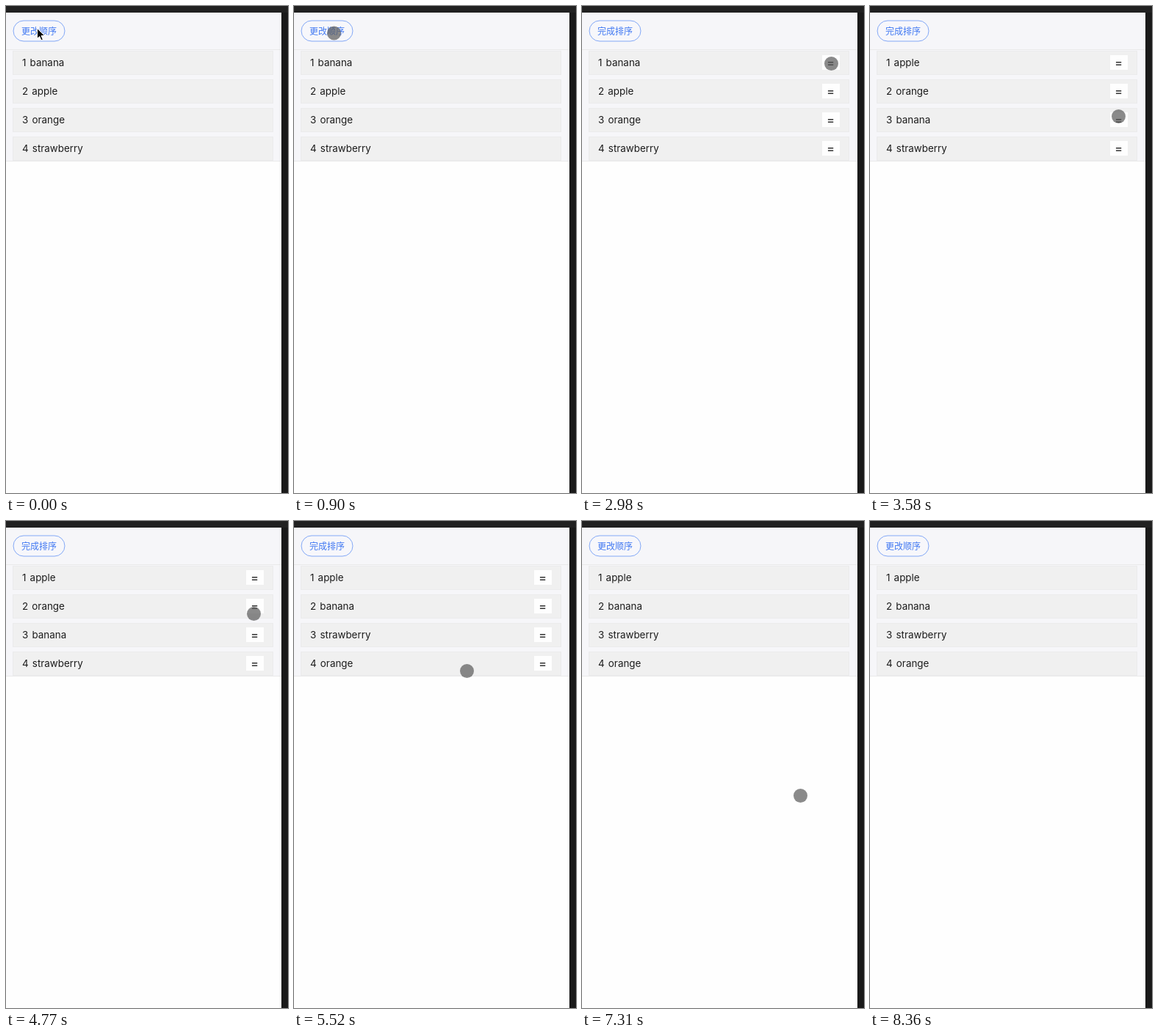
Recreate the animation shown at these times as an HTML page. Size 384 px wide and 664 px high, loop 9.41 s.

```html
<!DOCTYPE html>
<html lang="zh">
<head>
<meta charset="utf-8">
<style>
  html, body { margin: 0; width: 100%; height: 100%; overflow: hidden; background: #212121; }
  svg { display: block; width: 384px; height: 664px; }
  text { font: 13.4px Inter, sans-serif; word-spacing: 1.4px; fill: #1c1c1c; }
  .label { font: 12px "Noto Sans CJK SC", "Noto Sans CJK", sans-serif; fill: #4078f2; }
  .equals { font-size: 16px; font-weight: 500; fill: #333; text-anchor: middle; }
</style>
</head>
<body>
<svg viewBox="0 0 384 664">
  <rect width="384" height="664" fill="#212121"/>
  <rect x="375" y="9" width="9" height="655" fill="#1a1a1a"/>
  <rect y="9" width="375" height="655" fill="#fefefe"/>
  <rect y="9" width="375" height="203" fill="#f6f6f9"/>
  <path d="M0 59.5H375M0 211.5H375" stroke="#e9e9ea"/>
  <rect x="10" y="20" width="70" height="28" rx="14" fill="#f7f7fb" stroke="#83a8f6"/>
  <text class="label" id="label" x="21" y="38.5"></text>
  <g id="rows"></g>
  <path id="arrow" d="M42.5 30.5V44.5L45.7 41.5L48 46.8L50.3 45.8L48 40.6H52.5Z" fill="#000" stroke="#fff"/>
  <circle id="touch" r="9.5" fill="#585858" fill-opacity=".7"/>
</svg>
<script>
const LOOP = 9410;
const TICK = 148.8; // the screen refreshes in steps of this many ms
const FIRST_ROW_Y = 77, ROW_PITCH = 39;

// All times below are in ticks.
const TOUCH_START = 3, SORT_START = 9, SORT_END = 46;
const fruits = ["banana", "apple", "orange", "strawberry"];
const drags = [
  { row: 0, from: 21, to: 24 },
  { row: 1, from: 29, to: 35 }
];

const origin = { x: 80, y: 31 };
const move = (from, to, x, y) => ({ from, to, x, y });
const moves = [
  move(3, 6, 54.5, 37),        // onto the button
  move(11, 13, 329.5, 101.5),  // across to the handles
  move(13, 19, 339.5, 78.5),
  move(21, 24, 338.5, 150.5),  // first drag
  move(25, 26, 322.5, 146),
  move(26, 32, 337.5, 126.5),
  move(32, 35, 334.5, 240.5),  // second drag
  move(36, 37, 235.5, 204.5),  // back to the button
  move(37, 42, 52.5, 38),
  move(47, 49, 297.5, 374.5),  // out of the stage
  move(50, 56, 386, 700)
];

const clamp = (value, low, high) => Math.min(high, Math.max(low, value));
const byId = id => document.getElementById(id);
const show = (node, visible) => node.setAttribute("visibility", visible ? "visible" : "hidden");

function pointerAt(tick) {
  let { x, y } = origin;
  for (const step of moves) {
    const progress = clamp((tick - step.from) / (step.to - step.from), 0, 1);
    const eased = progress * (2 - progress) * 0.3 + progress * 0.7;
    x += (step.x - x) * eased;
    y += (step.y - y) * eased;
  }
  return { x, y };
}

// A dragged item takes the row under the pointer.
function orderAt(tick) {
  const order = [...fruits];
  for (const { row, from, to } of drags) {
    if (tick < from) continue;
    const { y } = pointerAt(Math.min(tick, to));
    const target = clamp(Math.round((y - FIRST_ROW_Y) / ROW_PITCH), 0, 3);
    order.splice(target, 0, ...order.splice(row, 1));
  }
  return order;
}

byId("rows").innerHTML = fruits.map((_, i) => `
  <g transform="translate(0 ${ROW_PITCH * i})">
    <rect x="9.5" y="61.5" width="354" height="32" fill="#f0f0f0" stroke="#ebebec"/>
    <text class="name" x="22" y="82"></text>
    <g class="handle">
      <rect x="327" y="67" width="24" height="20" fill="#fefefe"/>
      <text class="equals" x="338.7" y="83">=</text>
    </g>
  </g>`).join("");

const names = document.querySelectorAll(".name");
const handles = document.querySelectorAll(".handle");

function draw(time) {
  const tick = Math.floor(time / TICK);
  const sorting = tick >= SORT_START && tick < SORT_END;
  byId("label").textContent = sorting ? "完成排序" : "更改顺序";
  handles.forEach(handle => show(handle, sorting));

  const order = orderAt(tick);
  names.forEach((name, i) => name.textContent = `${i + 1} ${order[i]}`);

  const { x, y } = pointerAt(tick);
  byId("touch").setAttribute("cx", x);
  byId("touch").setAttribute("cy", y);
  show(byId("touch"), tick >= TOUCH_START);
  show(byId("arrow"), tick < TOUCH_START);
}

const start = performance.now();
function animate() {
  draw((performance.now() - start) % LOOP);
  requestAnimationFrame(animate);
}
animate();
</script>
</body>
</html>
```
